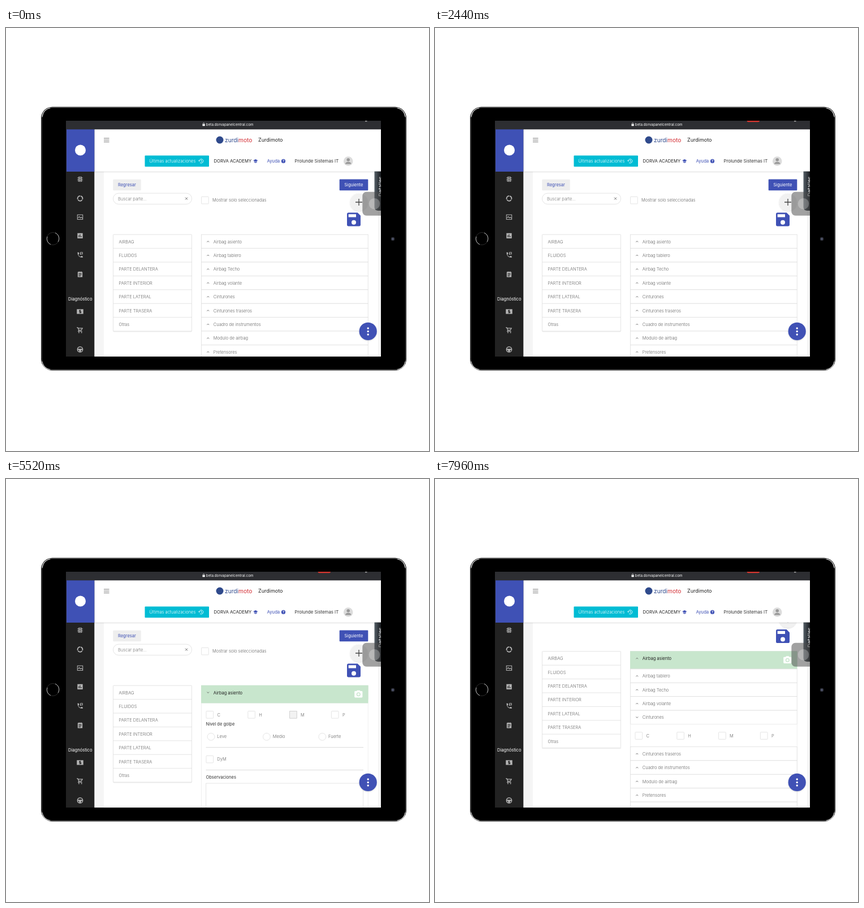
Recreate the animation shown at these times as an HTML page. Size 748 by 748 pixels, loop 8 s.

```html
<!DOCTYPE html>
<html lang="es">
<head>
<meta charset="utf-8">
<style>
html, body { margin: 0; width: 100%; height: 100%; overflow: hidden; background: #fff; }
svg { display: block; width: 748px; height: 748px; }
text { font-family: Inter, "Open Sans", sans-serif; }
</style>
</head>
<body>
<svg id="stage" viewBox="0 0 748 748"></svg>
<script>
const BLUE = '#3f51b5', LINE = '#dedede', GREY = '#666', ROW = 24.4, TOP = 365.2;

const rect = (x, y, w, h, fill, extra = '') =>
  `<rect x="${x}" y="${y}" width="${w}" height="${h}" fill="${fill}" ${extra}/>`;
const circle = (x, y, r, fill, extra = '') =>
  `<circle cx="${x}" cy="${y}" r="${r}" fill="${fill}" ${extra}/>`;
const text = (x, y, s, fill = GREY, size = 7.5, weight = 300, extra = '') =>
  `<text x="${x}" y="${y}" fill="${fill}" font-size="${size}" font-weight="${weight}" ${extra}>${s}</text>`;
const stroke = (d, color, width = 1, extra = '') =>
  `<path d="${d}" fill="none" stroke="${color}" stroke-width="${width}" ${extra}/>`;
const group = (id, body, extra = '') => `<g id="${id}" ${extra}>${body}</g>`;
const outline = (color = LINE, width = .8) => `stroke="${color}" stroke-width="${width}"`;
const box = (x, y) => rect(x, y, 12.6, 12.6, '#fff', `rx=".8" ${outline()}`);

// Icons are drawn on a 24-unit grid centred on (x, y).
const icon = (x, y, size, body) =>
  `<g transform="translate(${x} ${y}) scale(${size / 24}) translate(-12 -12)">${body}</g>`;
const solid = (d, fill) => `<path d="${d}" fill="${fill}" fill-rule="evenodd"/>`;

const SAVE = 'M17 3H5a2 2 0 0 0-2 2v14a2 2 0 0 0 2 2h14a2 2 0 0 0 2-2V7zM12 19a3 3 0 1 1 0-6 3 3 0 0 1 0 6zM15 9H5V5h10z';
const CAMERA = 'M9 3 7.2 5H4a2 2 0 0 0-2 2v12a2 2 0 0 0 2 2h16a2 2 0 0 0 2-2V7a2 2 0 0 0-2-2h-3.2L15 3zM12 8a5 5 0 1 1 0 10 5 5 0 0 1 0-10zM12 10a3 3 0 1 0 0 6 3 3 0 0 0 0-6z';

function sidebar() {
  const c = '#b4b4b4';
  const line = (d, w = 2) => stroke(d, c, w);
  const icons = [
    [267, solid('M7 3h10v18H7zM12 4a2 2 0 1 0 .1 0zM12 10a2 2 0 1 0 .1 0zM12 16a2 2 0 1 0 .1 0z', c) +
      line('M3 7h4M3 12h4M3 17h4M17 7h4M17 12h4M17 17h4')],
    [301, circle(12, 12, 8.5, 'none', `${outline(c, 3.5)} pathLength="30" stroke-dasharray="9 1" stroke-dashoffset="-3"`)],
    [334, line('M3 4h18v16H3zM5 15l4-5 4 5 3-3 4 4')],
    [367, solid('M3 3h18v18H3zM7 10v7h2v-7zM11 7v10h2V7zM15 13v4h2v-4z', c)],
    [401, solid('M3 3h5l1 5-3 3q3 5 7 7l3-3 5 1v5Q4 21 3 3z', c) + line('M13 3h8M13 3v8M13 9h7V3')],
    [435, solid('M4 4h4V2h2v2h4V2h2v2h4v18H4zM7 9v2h10V9zM7 13v2h10v-2zM7 17v2h7v-2z', c)],
    [501, solid('M1 4h22v16H1z', c) + stroke('M15 8h-5v4h5v4H9M12 6v12', '#222', 2)],
    [534, line('M1 3h3l4 9h8l4-7H5M8 12l-2 4h13', 2.4) + circle(8, 20, 2, c) + circle(17, 20, 2, c)],
    [568, circle(12, 12, 9, 'none', outline(c, 2.6)) + solid('M3 10h18v3l-5 1-2 7h-4l-2-7-5-1z', c)]
  ];
  return rect(106, 179, 50.3, 402, '#222') + rect(107, 179, 49.3, 75, BLUE) +
    circle(131.5, 216, 9.5, '#fff') +
    icons.map(([y, body]) => icon(131, y + .4, 12.5, body)).join('') +
    text(131.2, 481.5, 'Diagnóstico', '#fff', 7.6, 400, 'text-anchor="middle"');
}

function header() {
  return rect(156, 179, 507, 74.5, '#fff', 'filter="url(#soft)"') +
    stroke('M173 195h9.5M173 198.2h9.5M173 201.4h9.5', '#666', .9) +
    circle(378, 198, 6.5, '#2f4a8c') +
    text(387, 201.5, 'zurdi<tspan fill="#d32f35">moto</tspan>', '#2f4a8c', 10.2, 400) +
    text(446, 201, 'Zurdimoto', '#222', 9, 400) +
    rect(245.5, 225.5, 113.5, 19.7, '#00bcd4', 'rx="1"') +
    text(253.5, 238.4, 'Últimas actualizaciones', '#fff') +
    icon(345, 235.3, 10, stroke('M4 12a8.5 8.5 0 1 1 3 6.5M1 9l3 4 4-4M13 7v6l4 2', '#fff', 2)) +
    text(367.5, 238.4, 'DORVA ACADEMY', '#222', 7.7, 400) +
    icon(441.3, 235.3, 9, solid('M12 3 1 9l11 6 11-6zM5 13v4l7 4 7-4v-4l-7 4z', BLUE)) +
    text(461.5, 238.4, 'Ayuda', BLUE, 7.7, 400) +
    circle(490.5, 235.4, 3.6, BLUE) +
    text(490.5, 237.5, '?', '#fff', 5.6, 700, 'text-anchor="middle"') +
    text(510.5, 238.4, 'Prolunde Sistemas IT', '#333', 7.8, 400) +
    circle(605.2, 235.5, 8.3, '#dcdcdc') + circle(605.2, 233, 2.8, '#999') +
    solid('M600 240.5c0-5 10.4-5 10.4 0z', '#999');
}

function toolbar() {
  return rect(189.3, 267.8, 49.4, 19.4, '#eee', 'rx="1"') + text(198, 280.4, 'Regresar', BLUE, 7.5, 400) +
    rect(589.7, 267.5, 50.6, 19.7, BLUE, 'rx="1"') + text(598.3, 280.4, 'Siguiente', '#fff', 7.5, 400) +
    rect(189.5, 292.2, 139, 19.3, '#fff', `rx="9.6" ${outline()}`) +
    text(198, 304.6, 'Buscar parte...', '#777') +
    stroke('M317 299.5l4.2 4.2m0-4.2l-4.2 4.2', '#555', .8) +
    box(345.6, 298.3) + text(365, 307.2, 'Mostrar solo seleccionadas') +
    circle(624, 308, 15.3, '#f1f1f1', 'filter="url(#soft)"') +
    stroke('M618 308h12M624 302v12', '#444', 1.3) +
    icon(615, 338.5, 32, solid(SAVE, BLUE));
}

function categories() {
  const names = ['AIRBAG', 'FLUIDOS', 'PARTE DELANTERA', 'PARTE INTERIOR', 'PARTE LATERAL', 'PARTE TRASERA', 'Otras'];
  return rect(189.4, TOP, 139.2, ROW * 7, '#fff', `rx="1" filter="url(#faint)" ${outline()}`) +
    names.map((s, i) => text(199.5, TOP + ROW * i + 15.4, s) +
      (i ? stroke(`M189.4 ${TOP + ROW * i}h139.2`, LINE, .8) : '')).join('');
}

const checks = () => ['C', 'H', 'M', 'P'].map((s, i) =>
  box(354 + 73.8 * i, 14.2) + text(373.5 + 73.8 * i, 23.5, s)).join('');

function details() {
  const label = (y, s) => text(353.5, y, s, '#333', 7.5, 400);
  return label(39.3, 'Nivel de golpe') +
    ['Leve', 'Medio', 'Fuerte'].map((s, i) =>
      circle(362.5 + 98.4 * i, 59.5, 6.4, '#fff', outline()) + text(373.3 + 98.4 * i, 62.2, s)).join('') +
    stroke('M353.5 78.3h278.5M353.5 118.3h278.5', '#d6d6d6', .9) +
    box(354, 93) + text(373.3, 102.2, 'DyM') + label(133.5, 'Observaciones') +
    rect(353.7, 141.8, 278, 60, '#fff', outline());
}

const parts = ['Airbag asiento', 'Airbag tablero', 'Airbag Techo', 'Airbag volante', 'Cinturones',
  'Cinturones traseros', 'Cuadro de instrumentos', 'Modulo de airbag', 'Pretensores', '', ''];
const panel = (id, body) => group(id, rect(345.4, 0, 294.8, 240, '#fff', outline('#ececec')) + body);

function accordion() {
  return panel('panel0', checks() + rect(501.6, 14.2, 12.6, 12.6, '#f2f2f2', `id="pressed" ${outline('#ccc')}`) +
      group('details', details())) +
    parts.map((s, i) => (i === 5 ? panel('panel4', checks()) : '') + group('row' + i,
      rect(345.4, 0, 294.8, ROW, '#fff', outline()) +
      (i ? '' : group('marked', rect(345, -.4, 295.6, 31.5, '#c8e6cd') + icon(623.3, 14.8, 17, solid(CAMERA, '#fff')))) +
      (s && stroke('M-1.8 1.1 0-.9 1.8 1.1', '#555', .8, `id="arrow${i}"`) +
        text(366.8, 15.4, s, GREY, 7.5, 300, `id="label${i}"`))
    )).join('');
}

function tablet() {
  const gleam = d => stroke(d, '#ddd', 1.1, 'stroke-linecap="round"');
  return rect(62, 139.5, 646, 466, '#000', 'rx="20"') +
    rect(63.2, 140.7, 643.6, 463.6, 'none', `rx="18.8" ${outline('#666', 1)}`) +
    gleam('M64 157q2-13 14-15.5M706 157q-2-13-14-15.5M64 590q2 12 14 14M706 590q-2 12-14 14') +
    circle(83, 372.5, 11, '#000', outline('#2c2c2c', 1)) +
    stroke('M87 362.2a11 11 0 0 1 5 16M79 382.8a11 11 0 0 1-6-14', '#bbb', 1) +
    circle(684, 373, 3.2, '#30323c') + circle(684, 373, 1.5, '#59607c');
}

function overlays() {
  return rect(651.5, 246, 30, 77, 'url(#tab)', 'rx="6"') +
    text(0, 0, 'Detalles', '#fff', 9.4, 400, 'transform="translate(665.5 298) rotate(-90)"') +
    rect(630.3, 289.8, 42, 42, 'rgba(75,75,75,.52)', 'rx="7"') +
    circle(651.5, 310.8, 9.8, 'rgba(255,255,255,.25)') +
    circle(640.2, 536.4, 15.6, BLUE, 'filter="url(#soft)"') +
    [531, 536.5, 542].map(y => circle(640.2, y, 1.7, '#fff')).join('');
}

function statusBar() {
  return rect(106, 164, 557, 15.3, '#2d2e32') +
    rect(347.5, 170, 4.2, 3.3, '#fff', 'rx=".5"') + stroke('M348.4 170v-1a1.2 1.2 0 0 1 2.4 0v1', '#fff', .7) +
    text(353.8, 173.3, 'beta.dorvapanelcentral.com', '#fff', 6.3, 400) +
    rect(551.5, 161, 22.5, 5.3, '#d8362f', 'rx="2.5" id="rec"') +
    rect(635, 163.8, 3.5, 1.5, '#bbb');
}

const shadow = (id, blur, opacity) => `<filter id="${id}" x="-20%" y="-20%" width="140%" height="140%">
  <feDropShadow dx="0" dy=".8" stdDeviation="${blur}" flood-opacity="${opacity}"/></filter>`;

document.getElementById('stage').innerHTML = `<defs>
  ${shadow('soft', 1.2, .18)}${shadow('faint', .7, .12)}
  <linearGradient id="tab"><stop stop-color="#566068"/><stop offset=".4" stop-color="#16191d"/></linearGradient>
  <clipPath id="screen">${rect(106, 164, 557, 417, '#fff')}</clipPath></defs>` +
  tablet() + group('view',
    rect(106, 164, 557, 417, '#f5f5f5') + rect(173, 254, 485, 327, '#fff') +
    group('page', toolbar() + categories() + accordion()) +
    overlays() + header() + sidebar() + statusBar(),
    'clip-path="url(#screen)"');

const get = id => document.getElementById(id);
const show = (id, on) => get(id).setAttribute('visibility', on ? 'visible' : 'hidden');
const move = (id, y) => get(id).setAttribute('transform', `translate(0 ${y})`);
const ease = (t, start, end) => {
  const k = Math.min(1, Math.max(0, (t - start) / (end - start)));
  return k * k * (3 - 2 * k);
};

function draw(t) {
  const marked = t >= 4640;
  const opened = ease(t, 4040, 4280) * (1 - ease(t, 5840, 6120));
  const first = opened * (40 + 195 * ease(t, 4640, 4840));
  const fifth = 40 * ease(t, 6880, 7120);

  let y = TOP;
  parts.forEach((name, i) => {
    move('row' + i, y);
    y += i === 0 && marked ? 31.1 : ROW;
    if (i === 0) { move('panel0', y); y += first; }
    if (i === 4) { move('panel4', y); y += fifth; }
    if (!name) return;
    const down = i === 0 ? t >= 4040 && t < 5840 : i === 4 && t >= 6880;
    get('arrow' + i).setAttribute('transform', `translate(357.3 12.4) scale(1 ${down ? -1 : 1})`);
  });
  show('panel0', first > 0);
  show('panel4', fifth > 0);
  get('details').setAttribute('display', marked ? 'inline' : 'none');
  get('pressed').setAttribute('display', t >= 4560 ? 'inline' : 'none');
  show('marked', marked);
  get('label0').setAttribute('fill', marked ? '#222' : GREY);
  get('label0').setAttribute('font-weight', marked ? 400 : 300);
  move('page', -60.4 * ease(t, 7280, 7680));
  show('rec', t >= 80);
}

function tick() {
  draw(performance.now() % 8000);
  requestAnimationFrame(tick);
}
tick();
</script>
</body>
</html>
```
